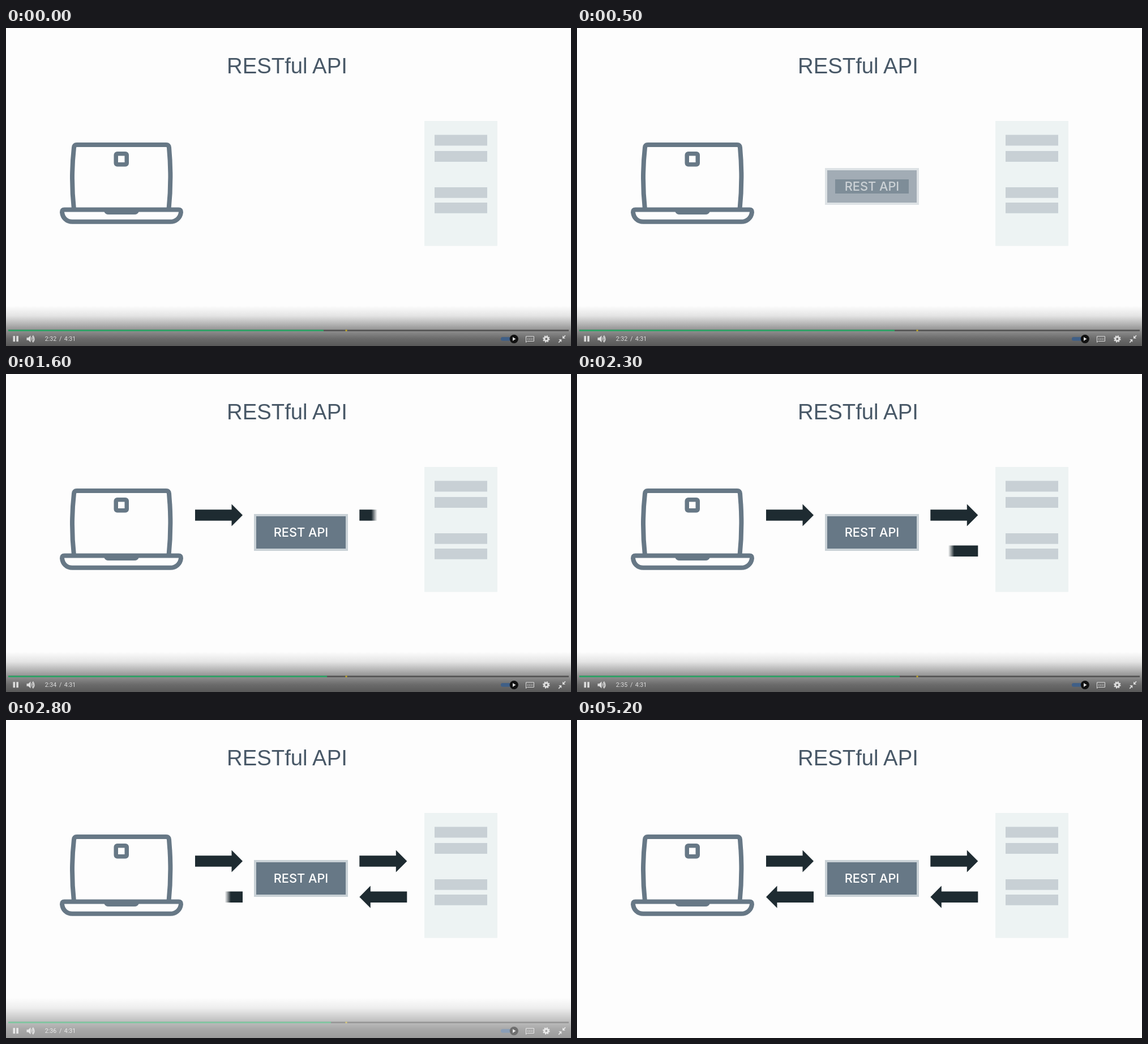
Recreate the animation shown at these times as an HTML page. Size 998 by 561 pixels, loop 5.3 s.

```html
<!DOCTYPE html>
<html lang="en">
<head>
<meta charset="utf-8">
<title>RESTful API</title>
<style>
  html, body { margin: 0; width: 100%; height: 100%; overflow: hidden; background: #fdfdfd; }
  svg { display: block; width: 100vw; height: 100vh; }
  .title { font: 38.3px "Liberation Sans", Arial, sans-serif; fill: #485867; }
  .label { font: 500 21.8px Inter, sans-serif; fill: #fff; }
  .clock { font: 10.6px Roboto, sans-serif; fill: #ddd; }
  .line { fill: none; stroke: #677886; stroke-width: 8; stroke-linejoin: round; }
  .slate { fill: #677886; }
  .icon { fill: #ddd; }
  .thin { fill: none; stroke: #ddd; }
</style>
</head>
<body>
<svg viewBox="0 0 998 561">
  <defs>
    <linearGradient id="shade" x1="0" y1="490" x2="0" y2="561" gradientUnits="userSpaceOnUse">
      <stop offset="0" stop-opacity="0"/>
      <stop offset=".25" stop-opacity=".1"/>
      <stop offset=".6" stop-opacity=".42"/>
      <stop offset=".82" stop-opacity=".58"/>
      <stop offset="1" stop-opacity=".65"/>
    </linearGradient>
  </defs>

  <text class="title" x="390" y="80">RESTful API</text>

  <g id="laptop">
    <path class="line" d="M120 320Q114 265 120 211Q120.500 206 125 206H283Q287.500 206 288 211Q293 265 287.500 320"/>
    <path class="line" d="M103 320.500H305Q309 320.500 309 325C308 335 300 341.800 290 341.800H117C107 341.800 100 335 99 325Q99 320.500 103 320.500Z"/>
    <path class="slate" d="M173 321H235V323Q233 329 227 329H181Q175 329 173 323Z"/>
    <rect class="slate" x="190.500" y="218" width="26.500" height="26.500" rx="6"/>
    <rect x="198" y="225.500" width="11.500" height="11.500" fill="#fdfdfd"/>
  </g>

  <g id="server" fill="#c8d0d5">
    <rect x="739" y="164" width="129" height="220.500" fill="#edf3f3"/>
    <path d="M757 188.500h93v19h-93zM757 217h93v19h-93zM757 281h93v18.700h-93zM757 308h93v18.700h-93z"/>
  </g>

  <g id="arrows"></g>

  <g id="api">
    <rect class="fade" x="440" y="249" width="162" height="61" fill="#677886" stroke="#c9d1d6" stroke-width="4"/>
    <rect class="fade slate" x="456" y="267" width="130" height="25"/>
    <text class="fade label" x="521" y="287" text-anchor="middle">REST API</text>
  </g>

  <g id="player">
    <rect y="490" width="998" height="71" fill="url(#shade)"/>
    <rect x="4" y="532.300" width="990" height="2.700" fill="#555"/>
    <rect id="played" x="4" y="532.300" height="2.700" fill="#2fa467"/>
    <rect x="599.500" y="532.300" width="3" height="2.700" fill="#c2a727"/>
    <path class="icon" d="M12.500 543.300h3.600v10h-3.600zM18.300 543.300h3.600v10h-3.600z"/>
    <path class="icon" d="M36.500 546.300h3l4-3.800v12l-4-3.800h-3z"/>
    <path class="thin" stroke-width="1.300" d="M45 546q2 2.500 0 5M46.300 543.800q4.200 4.700 0 9.400M47.500 542.300q5 6.200 0 12.400"/>
    <text class="clock" id="clock" x="68.800" y="552"></text>
    <text class="clock" x="94" y="552">/</text>
    <text class="clock" x="102.800" y="552">4:31</text>
    <rect x="874" y="545.300" width="18" height="6.500" rx="3" fill="#3f5f87"/>
    <circle cx="897.300" cy="548.600" r="7.600" fill="#111"/>
    <path class="icon" d="M895 545.300l5.500 3.300-5.500 3.300z"/>
    <path class="thin" d="M918.500 544h14v8.500h-12l-2 2z"/>
    <path class="thin" stroke-width="1.400" stroke-dasharray="1.500 1.500" d="M921 548.700h10"/>
    <circle class="thin" cx="954.300" cy="548.500" r="3.400" stroke-width="3"/>
    <circle class="thin" cx="954.300" cy="548.500" r="5.300" stroke-width="2" stroke-dasharray="2.080"/>
    <path class="icon" d="M983 547.800v-5l1.700 1.700 2.800-2.800 1.200 1.200-2.800 2.800 2.100 2.100zM981.300 549.300v5l-1.700-1.700-2.800 2.800-1.200-1.200 2.800-2.800-2.100-2.100z"/>
  </g>
</svg>
<script>
const LOOP = 5300, STEP = 100, SOFT = 10.5;
const $ = id => document.getElementById(id);
const clamp = v => Math.max(0, Math.min(1, v));

// Each arrow is wiped in from its tail, which sits at x, y.
const arrows = [
  { x: 334, y: 249, dir: 1, start: 9 },
  { x: 624.3, y: 249, dir: 1, start: 15 },
  { x: 708.3, y: 312.2, dir: -1, start: 21 },
  { x: 418, y: 312.2, dir: -1, start: 27 }
];
$('arrows').innerHTML = arrows.map(({ x, y, dir }, i) => `
  <g transform="translate(${x} ${y}) scale(${dir} 1)">
    <linearGradient id="wipe${i}" gradientUnits="userSpaceOnUse">
      <stop offset="0" stop-color="#1e2b31"/>
      <stop offset="1" stop-color="#1e2b31" stop-opacity="0"/>
    </linearGradient>
    <path id="arrow${i}" fill="url(#wipe${i})" d="M0-9.800H64.500V-19.600L84 0 64.500 19.600V9.800H0Z"/>
  </g>`).join('');

const ticks = [6, 13, 20, 27];
const playedEnds = [561, 564, 567, 570, 574];
const fading = document.querySelectorAll('.fade');

function draw(time) {
  const step = Math.floor(time % LOOP / STEP);

  const apiOpacity = clamp((step - 2) / 5);
  fading.forEach(el => el.setAttribute('opacity', apiOpacity));

  arrows.forEach(({ start }, i) => {
    const front = SOFT + 21 * Math.min(4, step - start);
    $('arrow' + i).setAttribute('visibility', step < start ? 'hidden' : 'visible');
    $('wipe' + i).setAttribute('x1', front - SOFT);
    $('wipe' + i).setAttribute('x2', front);
  });

  const seconds = ticks.filter(tick => step >= tick).length;
  $('clock').textContent = '2:' + (32 + seconds);
  $('played').setAttribute('width', playedEnds[seconds] - 4);
  $('player').setAttribute('opacity', clamp((31 - step) / 5));
}

function frame() {
  draw(performance.now());
  requestAnimationFrame(frame);
}
frame();
</script>
</body>
</html>
```
